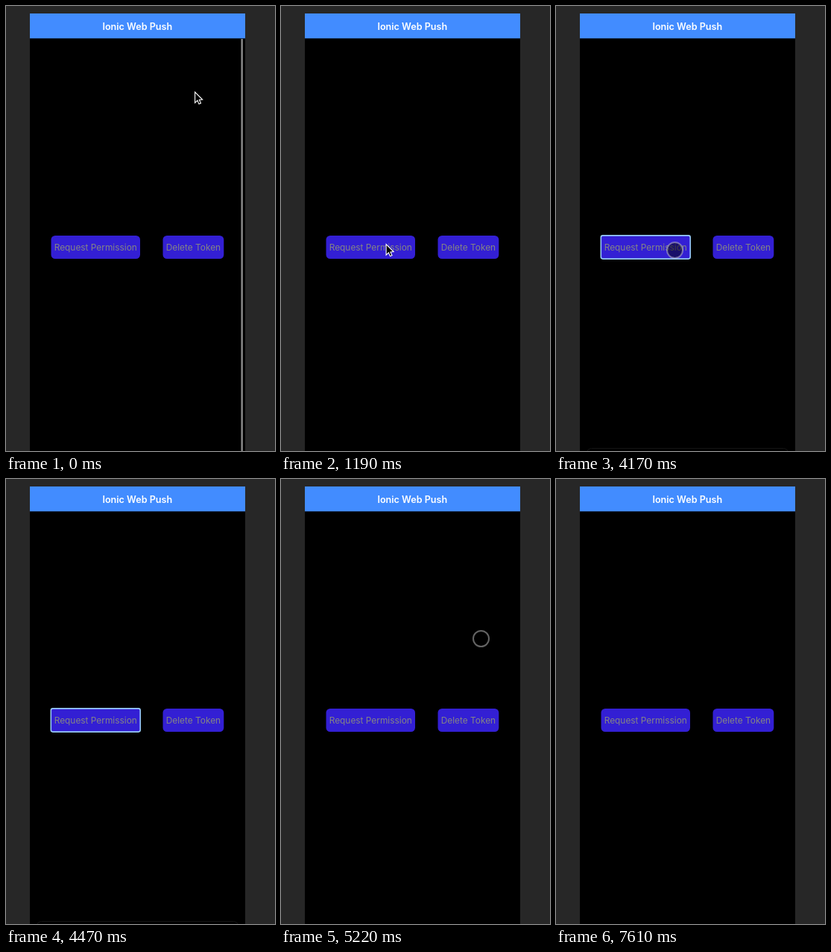
An HTML page with a canvas for the animation above (8000 ms loop, 361 by 595 pixels).

```html
<!DOCTYPE html>
<html lang="en">
<head>
<meta charset="utf-8">
<title>Web push demo</title>
<style>
  html, body { margin: 0; width: 100%; height: 100%; overflow: hidden; background: #272727; }
  canvas { display: block; }
</style>
</head>
<body>
<canvas id="stage" width="361" height="595"></canvas>
<script>
const ctx = document.getElementById('stage').getContext('2d');
const LOOP = 8000;

// Screen capture: the pointer holds each position until the next entry.
const pointer = [
  [0, 'arrow', 253, 114],
  [140, 'arrow', 271, 124],
  [440, 'arrow', 271, 144.5],
  [590, 'arrow', 229, 247.5],
  [740, 'arrow', 169, 298.5],
  [890, 'arrow', 143, 308.5],
  [1040, 'arrow', 140.5, 313.5],
  [1190, 'arrow', 140.5, 317.5],
  [2390, 'touch', 143.5, 329],
  [4170, 'touch', 159.5, 326.5],
  [4320, 'touch', 293.5, 227.5],
  [4470, 'none'],
  [5070, 'touch', 268.5, 213.5],
  [7320, 'touch', 294.5, 185.5],
  [7470, 'arrow', 345, 154],
  [7610, 'none']
];

const within = (t, from, to) => t >= from && t < to;

function rect(x, y, w, h, color) {
  ctx.fillStyle = color;
  ctx.fillRect(x, y, w, h);
}

function roundPath(x, y, w, h, r) {
  ctx.beginPath();
  ctx.roundRect(x, y, w, h, r);
}

function text(str, x, y, size, color, weight = 400, align = 'left') {
  ctx.font = `${weight} ${size}px Inter, "Open Sans", sans-serif`;
  ctx.textAlign = align;
  ctx.fillStyle = color;
  ctx.fillText(str, x, y);
}

function button(label, x, w, focused) {
  roundPath(x, 307, w, 31, focused ? 3 : 5.5);
  ctx.fillStyle = '#331fd4';
  ctx.fill();
  text(label, x + w / 2, 327.2, 11.9, '#858585', 400, 'center');
  if (!focused) return;
  roundPath(x - 0.2, 306.9, w + 0.4, 31.2, 2.5);
  ctx.strokeStyle = '#97cbf8';
  ctx.lineWidth = 1.6;
  ctx.stroke();
}

function tooltip() {
  ctx.save();
  ctx.shadowColor = 'rgba(0,0,0,.35)';
  ctx.shadowBlur = 3;
  roundPath(34, 18, 108, 28, 3);
  ctx.fillStyle = '#fff';
  ctx.fill();
  ctx.restore();
  text('app-root', 42.6, 37, 12.3, '#881280', 700);
  [['0', 110.3], ['×', 120], ['0', 129.7]].forEach(([s, x]) =>
    text(s, x, 37, 12.3, '#5a5a5a', 400, 'center'));
}

function arrow(x, y) {
  const points = [[0.6, 1], [0.6, 15.4], [3.9, 12.3], [6, 17.1], [8.5, 16], [6.4, 11.4], [10.6, 11.1]];
  ctx.beginPath();
  points.forEach(([px, py]) => ctx.lineTo(x + px, y + py));
  ctx.closePath();
  ctx.fillStyle = '#000';
  ctx.fill();
  ctx.strokeStyle = '#fff';
  ctx.lineWidth = 1.1;
  ctx.stroke();
}

function touch(x, y) {
  ctx.beginPath();
  ctx.arc(x, y, 10.5, 0, Math.PI * 2);
  ctx.fillStyle = 'rgba(0,0,0,.5)';
  ctx.fill();
  ctx.strokeStyle = 'rgba(200,200,200,.5)';
  ctx.lineWidth = 2;
  ctx.stroke();
}

function draw(t) {
  rect(0, 0, 361, 595, '#272727');
  rect(32, 10, 289, 585, '#000');
  rect(32, 10, 289, 33.3, '#428cff');
  text('Ionic Web Push', 176.3, 31.5, 12.6, '#fff', 600, 'center');

  if (t < 290) rect(315.5, 44, 2.3, 551, t < 140 ? '#8f8f8f' : '#484848');

  button('Request Permission', 60.5, 119.5, within(t, 2680, 5220));
  button('Delete Token', 210.5, 81.8, false);

  if (within(t, 4170, 5220)) {
    roundPath(41.5, 591.5, 270, 20, 6);
    ctx.strokeStyle = '#141414';
    ctx.lineWidth = 1;
    ctx.stroke();
  }
  if (within(t, 4920, 5070)) tooltip();

  const [, kind, x, y] = pointer.findLast(([start]) => start <= t);
  if (kind === 'arrow') arrow(x, y);
  if (kind === 'touch') touch(x, y);
}

const begin = performance.now();
function tick() {
  draw((performance.now() - begin) % LOOP);
  requestAnimationFrame(tick);
}
tick();
</script>
</body>
</html>
```
